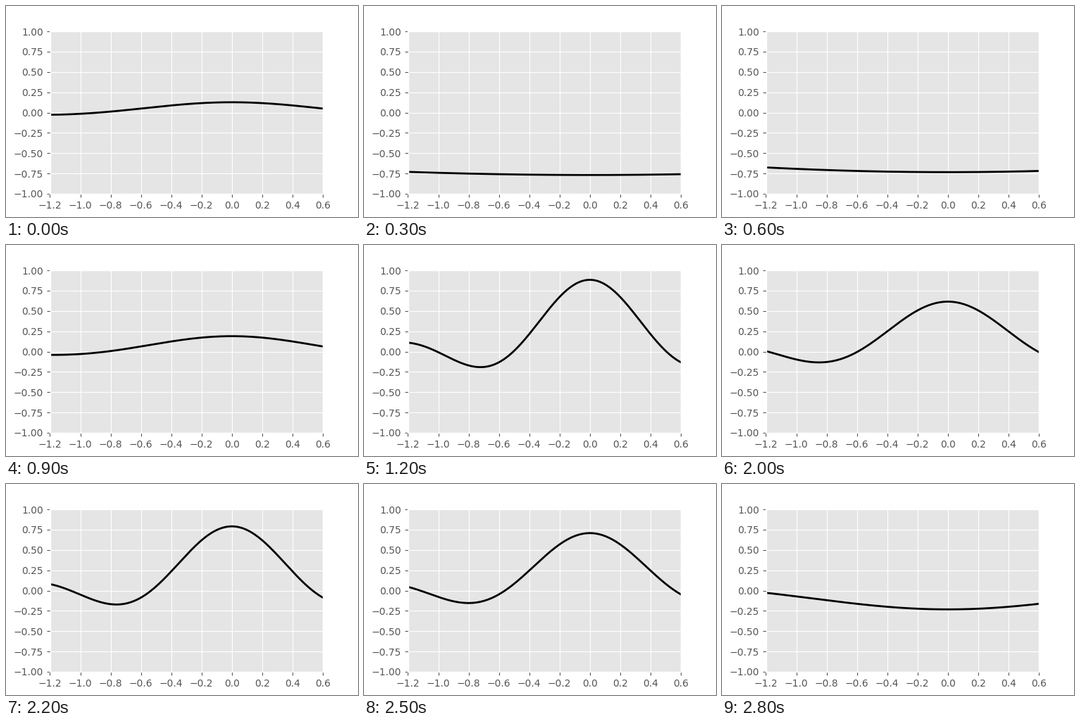
Recreate the animation shown at these times as a matplotlib script. Size 500 px wide and 300 px high, loop 2900 ms.

```python
import numpy as np
import matplotlib.pyplot as plt
from matplotlib.animation import FuncAnimation

FRAMES = 29
INTERVAL = 100
AMPLITUDE = 0.9
PHASE = 3.0
STEP = 72 / FRAMES  # phase advance per frame, in radians

plt.style.use("ggplot")
plt.rcParams["font.family"] = "DejaVu Sans"

x = np.linspace(-1.2, 0.6, 300)


def wave(frame):
    """Sinc pulse whose height and frequency share one sine swing."""
    swing = np.sin(PHASE + STEP * frame)
    return AMPLITUDE * swing * np.sinc((1 + swing) * x)


fig, ax = plt.subplots(figsize=(5, 3), dpi=100, facecolor="white")
ax.set_xlim(-1.2, 0.6)
ax.set_ylim(-1, 1)
ax.set_xticks(np.arange(-6, 4) / 5)
ax.set_yticks(np.arange(-4, 5) / 4)
line, = ax.plot(x, wave(0), color="black", lw=2)


def update(frame):
    line.set_ydata(wave(frame))
    return line,


anim = FuncAnimation(fig, update, frames=FRAMES, interval=INTERVAL,
                     repeat=True, repeat_delay=0)
plt.show()
```
